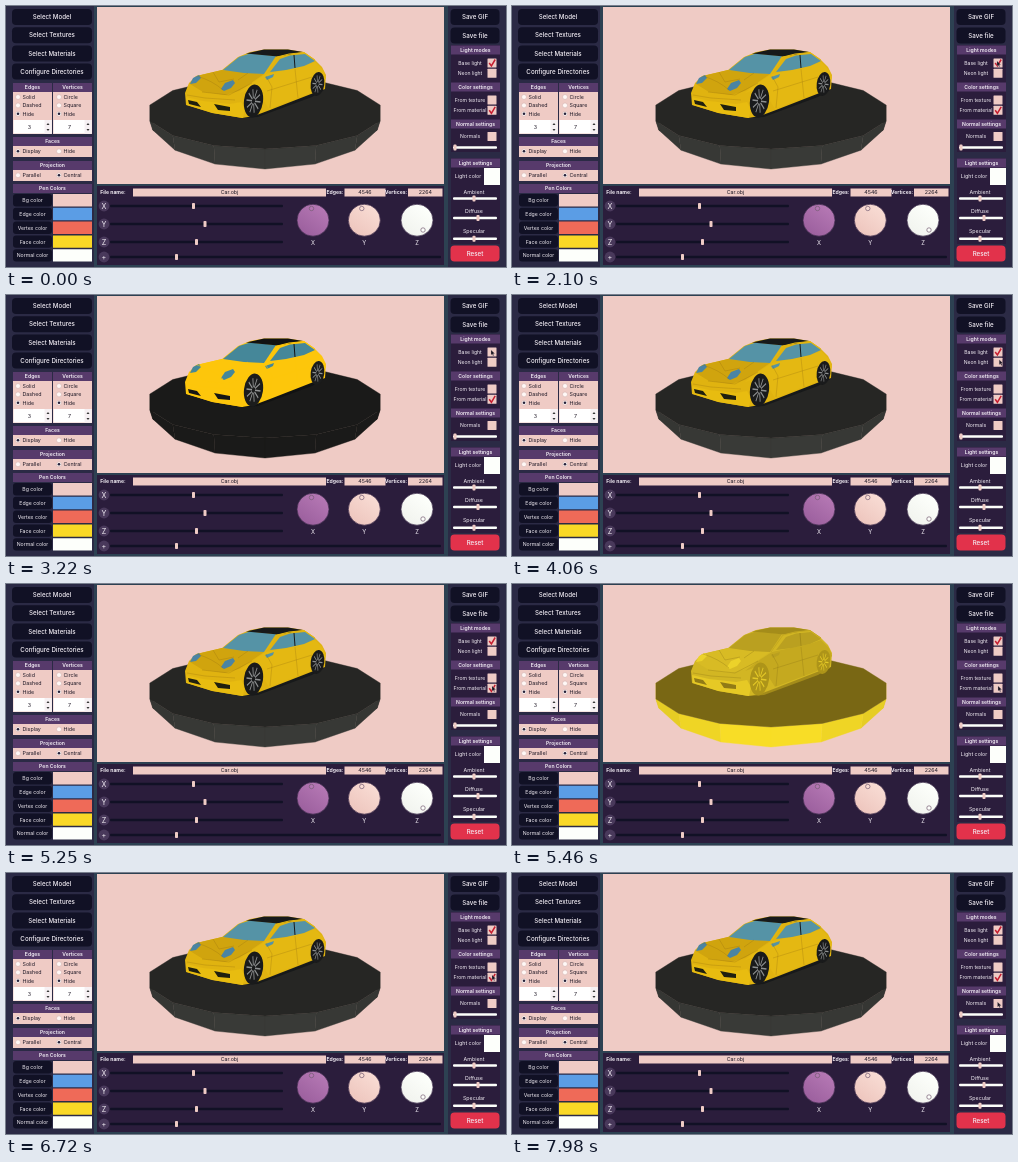
An HTML page with a canvas for the animation above (8 s loop, 500 px wide and 261 px high).

```html
<!DOCTYPE html>
<html lang="en">
<head>
<meta charset="utf-8">
<title>Model viewer</title>
<style>
html, body { margin: 0; width: 100%; height: 100%; overflow: hidden; background: #2d3a49; }
canvas { display: block; width: 500px; height: 261px; }
</style>
</head>
<body>
<canvas id="stage"></canvas>
<script>
const LOOP = 8000;
const W = 500, H = 261;
const canvas = document.getElementById('stage');
const ctx = canvas.getContext('2d');
const scale = window.devicePixelRatio || 1;
canvas.width = W * scale;
canvas.height = H * scale;

const C = {
  slate: '#2d4152', column: '#2b2a45', navy: '#111125', panel: '#2b1d3c', purple: '#573a6b',
  pink: '#efcbc5', white: '#fdfffb', light: '#f4eff6', red: '#e2324b', ink: '#1c1624'
};

function rect(x, y, w, h, color, r = 0) {
  ctx.fillStyle = color;
  ctx.beginPath();
  ctx.roundRect(x, y, w, h, r);
  ctx.fill();
}

function disc(x, y, r, color, edge) {
  ctx.beginPath();
  ctx.arc(x, y, r, 0, Math.PI * 2);
  ctx.fillStyle = color;
  ctx.fill();
  if (edge) {
    ctx.strokeStyle = edge;
    ctx.lineWidth = 0.7;
    ctx.stroke();
  }
}

function text(str, x, y, { size = 5.3, color = C.light, align = 'center', weight = 400 } = {}) {
  ctx.font = `${weight} ${size}px Inter, sans-serif`;
  ctx.textAlign = align;
  ctx.textBaseline = 'alphabetic';
  ctx.fillStyle = color;
  ctx.fillText(str, x, y + size * 0.36);
}

function path(d, color, line) {
  const p = new Path2D(d);
  if (line) {
    ctx.strokeStyle = color;
    ctx.lineWidth = line;
    ctx.stroke(p);
  } else {
    ctx.fillStyle = color;
    ctx.fill(p);
  }
}

function button(str, x, y, w, h, color = C.navy) {
  rect(x, y, w, h, color, 4);
  text(str, x + w / 2, y + h / 2, { size: 6.2, weight: 500 });
}

function header(str, x, y, w) {
  rect(x, y, w, 9, C.purple);
  text(str, x + w / 2, y + 4.5, { size: 5.1, weight: 600 });
}

function radio(str, x, y, on) {
  disc(x, y, 2.5, '#fff8f6', '#d9b9b6');
  if (on) disc(x, y, 1.3, '#25213a');
  text(str, x + 4.5, y, { color: C.ink, align: 'left' });
}

function spinner(value, x) {
  rect(x, 114, 38, 13.5, '#fff');
  rect(x + 31, 114, 7, 13.5, '#f6f0f3');
  text(value, x + 16, 121, { color: C.ink });
  path(`M${x + 33} 119l1.5 -2 1.5 2zM${x + 33} 123l1.5 2 1.5 -2z`, '#333');
}

function slider(x, y, w, knob, track = C.navy) {
  rect(x, y - 1.2, w, 2.4, track, 1);
  rect(knob - 1.5, y - 3, 3, 6, C.pink, 0.8);
}

function checkbox(str, y, on) {
  text(str, 464, y, { size: 5.1 });
  rect(481.5, y - 4.5, 9, 9, C.pink, 0.5);
  if (on) path(`M483.2 ${y}l2.2 3 3.8 -6.5`, '#c61d30', 1.5);
}

function field(str, x, w) {
  rect(x, 182.5, w, 8, C.pink);
  text(str, x + w / 2, 186.5, { color: C.ink });
}

function dial(name, x, color, shade, dotX, dotY) {
  const g = ctx.createLinearGradient(x + 10, 203, x - 8, 227);
  g.addColorStop(0, color);
  g.addColorStop(1, shade);
  disc(x, 214.2, 16, g, '#3b2a49');
  disc(dotX, dotY, 2.2, color, '#755c72');
  text(name, x, 237, { size: 5.8 });
}

function leftPanel() {
  rect(0, 0, 88, H, C.column);
  ['Select Model', 'Select Textures', 'Select Materials', 'Configure Directories']
    .forEach((s, i) => button(s, 6, 3 + i * 18.2, 80, 16));

  header('Edges', 7, 77, 39);
  header('Vertices', 47, 77, 39);
  rect(7, 86, 39, 42, C.pink);
  rect(47, 86, 39, 42, C.pink);
  ['Solid', 'Dashed', 'Hide'].forEach((s, i) => radio(s, 12, 91 + i * 8.4, i === 2));
  ['Circle', 'Square', 'Hide'].forEach((s, i) => radio(s, 53, 91 + i * 8.4, i === 2));
  spinner('3', 7.5);
  spinner('7', 47.5);

  header('Faces', 7, 131, 79);
  rect(7, 140, 79, 11, C.pink);
  radio('Display', 12, 145.3, true);
  radio('Hide', 53, 145.3, false);
  header('Projection', 7, 155, 79);
  rect(7, 164, 79, 11, C.pink);
  radio('Parallel', 12, 169.3, false);
  radio('Central', 53, 169.3, true);

  header('Pen Colors', 7, 178, 79);
  [['Bg color', C.pink], ['Edge color', '#5b9de5'], ['Vertex color', '#ef6a58'],
   ['Face color', '#fad826'], ['Normal color', C.white]].forEach(([s, color], i) => {
    const y = 188 + i * 13.8;
    rect(7, y, 39, 12.4, C.navy, 3);
    text(s, 26.5, y + 6.3, { size: 5.2 });
    rect(47, y, 39, 12.4, color);
  });
}

function rightPanel(mode) {
  rect(442, 0, 58, H, C.column);
  button('Save GIF', 444.5, 3, 49, 16);
  button('Save file', 444.5, 21.5, 49, 16);
  rect(445, 39, 49, 107, C.panel);
  rect(445, 152, 49, 86, C.panel);
  header('Light modes', 445, 39.5, 49);
  checkbox('Base light', 57, mode !== 'flat');
  checkbox('Neon light', 67.3, false);
  header('Color settings', 445, 76.5, 49);
  checkbox('From texture', 94, false);
  checkbox('From material', 104.3, mode !== 'face');
  header('Normal settings', 445, 113.5, 49);
  checkbox('Normals', 130.5, false);
  slider(447, 141.5, 44, 449, C.white);
  header('Light settings', 445, 152.5, 49);
  text('Light color', 462, 170.3);
  rect(478, 162, 16, 17, C.white);
  [['Ambient', 186, 192.5, 468], ['Diffuse', 205, 212, 472], ['Specular', 225, 232.7, 468]]
    .forEach(([s, ty, sy, knob]) => {
      text(s, 468, ty);
      slider(447, sy, 44, knob, C.white);
    });
  button('Reset', 444.5, 239.5, 49, 16, C.red);
}

function bottomPanel() {
  const bold = { size: 5.1, weight: 700 };
  rect(91, 180, 347, 79, C.panel);
  text('File name:', 107, 186.3, bold);
  field('Car.obj', 127, 193);
  text('Edges:', 329, 186.3, bold);
  field('4546', 338.5, 41);
  text('Vertices:', 390, 186.3, bold);
  field('2264', 402, 34.5);

  [['X', 200, 187.5], ['Y', 218, 199], ['Z', 236, 190.5], ['+', 251, 170.5]].forEach(([s, y, knob], i) => {
    disc(98, y, 5.4, '#49395b');
    text(s, 98, y, { size: 7.2 });
    slider(104, y, i === 3 ? 331 : 173, knob);
  });

  dial('X', 307, '#b477b3', '#9d619f', 305.5, 202.5);
  dial('Y', 358.3, '#f8dbd3', '#eec7bf', 355.8, 202.5);
  dial('Z', 411, '#fdfffb', '#f2f4ef', 417, 224);
}

// Colours of the scene for each shading mode.
const SHADES = {
  lit: {
    top: '#262624', side: [58, 59, 56], body: '#e0b310', hood: '#d0a40e', flank: '#e4b812', low: '#e8bc10',
    glass: '#5593a6', roof: '#17191a', lamp: '#4b84a3', vent: '#20200f', tyre: '#191a1b', rim: '#8d8f90', line: '#8d6b1088'
  },
  flat: {
    top: '#1a1a19', side: [26, 26, 25], body: '#fdc60b', hood: '#fdc60b', flank: '#fdc60b', low: '#fdc60b',
    glass: '#458799', roof: '#111212', lamp: '#458799', vent: '#151515', tyre: '#1b1c1c', rim: '#929393', line: '#fdc60b'
  },
  face: {
    top: '#796714', side: [252, 225, 39], body: '#d2b623', hood: '#d8bb24', flank: '#c5a91f', low: '#e6c925',
    glass: '#baa020', roof: '#a48c1a', lamp: '#ecd22a', vent: '#917b16', tyre: '#ad9419', rim: '#e4c827', line: '#8f7817aa'
  }
};

const SIDES = 14;

function ring(i, rx, cy, ry) {
  const a = i * 2 * Math.PI / SIDES;
  return [259 + rx * Math.sin(a), cy + ry * Math.cos(a)];
}

function poly(points, color) {
  ctx.beginPath();
  points.forEach(p => ctx.lineTo(...p));
  ctx.closePath();
  ctx.fillStyle = color;
  ctx.fill();
  ctx.strokeStyle = color;
  ctx.lineWidth = 0.4;
  ctx.stroke();
}

function platform(s, shaded) {
  const top = i => ring(i, 118, 107, 36);
  const base = i => ring(i, 115, 113, 50);
  for (const i of [-4, 3, -3, 2, -2, 1, -1, 0]) {
    const k = shaded ? 1 - 0.035 * Math.abs(i + 0.5) : 1;
    poly([top(i), top(i + 1), base(i + 1), base(i)], `rgb(${s.side.map(v => v * k)})`);
  }
  poly(Array.from({ length: SIDES }, (_, i) => top(i)), s.top);
}

function wheel(x, y, rx, ry, s) {
  ctx.save();
  ctx.translate(x, y);
  ctx.rotate(0.13);
  ctx.scale(rx, ry);
  disc(0, 0, 1, s.tyre);
  ctx.strokeStyle = s.rim;
  ctx.lineWidth = 0.09;
  ctx.beginPath();
  for (let i = 0; i < 10; i++) {
    const a = i * Math.PI / 5;
    ctx.moveTo(0.15 * Math.cos(a), 0.15 * Math.sin(a));
    ctx.lineTo(0.74 * Math.cos(a), 0.74 * Math.sin(a));
  }
  ctx.stroke();
  disc(0, 0, 0.16, s.tyre);
  ctx.restore();
}

function car(s) {
  path('M183 100L237 112 252 111 306 91 318 84 312 70 180 88z', s.roof);
  path('M180 99L179 87 183 77 190 70 216 64 232 51 244 46 258 43.5 282 43.5 298 46 308 53 316 61 320 69 319 83 305 88 264 104 248 110 236 112 207 107z', s.body);
  path('M184 78L191 70 216 64 258 68 245 77 233 85 219 89 197 86z', s.hood);
  path('M233 87L246 77 260 68 298 60 309 56 317 64 320 72 305 87 263 103 256 92 250 81z', s.flank);
  path('M180 91L197 95 224 98 235 96 239 103 237 112 206 107 181 99z', s.low);
  path('M217 64L233 51 244 47.5 270 50 258 68 238 67z', s.glass);
  path('M240 47.5L258 43.5 282 43.5 297 46 272 50.5z', s.roof);
  path('M264 66L274 53 284 49.5 299 48 309 55 298 60 280 64z', s.glass);
  path('M259 68L271 51 283 48 298 46.5 309 54', s.flank, 1);
  path('M288 49L289 62', s.roof, 1);
  path('M184 78L187 72 193 69 195 72 190 77z', s.lamp);
  path('M215 83L219 77 227 74 229 77 225 82 218 85z', s.lamp);
  path('M182 94L191 96 195 101 183 98zM208 98L224 101 224 105 212 104z', s.vent);
  path('M259 71L268 68 267 71 261 74z', s.glass);
  path('M191 70Q207 75 217 84M207 66L213 76 228 73M196 86L223 89 246 77M181 89L199 92 229 94M260 70L266 81 264 102M289 63L292 92M261 85L306 71M242 67L232 74', s.line, 0.5);
  wheel(247.5, 95, 9.5, 16.5, s);
  wheel(311.5, 78, 6.8, 12, s);
}

// Pointer route: [time, x, y].
const ROUTE = [
  [1700, 493, 74], [2100, 485, 55], [3780, 485, 55], [4200, 488, 68], [4690, 488, 92], [5250, 486, 102],
  [7140, 486, 102], [7560, 486, 122], [7770, 485.5, 129], [8000, 485.5, 129]
];

function pointer(t) {
  const n = ROUTE.findIndex(p => p[0] > t);
  if (n < 1) return;
  const [t0, x0, y0] = ROUTE[n - 1], [t1, x1, y1] = ROUTE[n];
  const k = (t - t0) / (t1 - t0), e = k * k * (3 - 2 * k);
  ctx.save();
  ctx.translate(x0 + (x1 - x0) * e, y0 + (y1 - y0) * e);
  const shape = 'M0 0L0 5 1.2 4 2 5.8 2.9 5.4 2.1 3.7 3.7 3.6z';
  path(shape, '#1a1420');
  path(shape, '#bdaeb5', 0.25);
  ctx.restore();
}

function modeAt(t) {
  if (t >= 2310 && t < 3430) return 'flat';
  if (t >= 5460 && t < 6720) return 'face';
  return 'lit';
}

function draw(now) {
  const t = now % LOOP;
  const mode = modeAt(t);
  ctx.setTransform(scale, 0, 0, scale, 0, 0);
  rect(0, 0, W, H, C.slate);
  rect(91, 1, 347, 177, C.pink);
  platform(SHADES[mode], mode !== 'flat');
  car(SHADES[mode]);
  leftPanel();
  bottomPanel();
  rightPanel(mode);
  pointer(t);
}

const start = performance.now();
function tick() {
  draw(performance.now() - start);
  requestAnimationFrame(tick);
}
tick();
</script>
</body>
</html>
```
